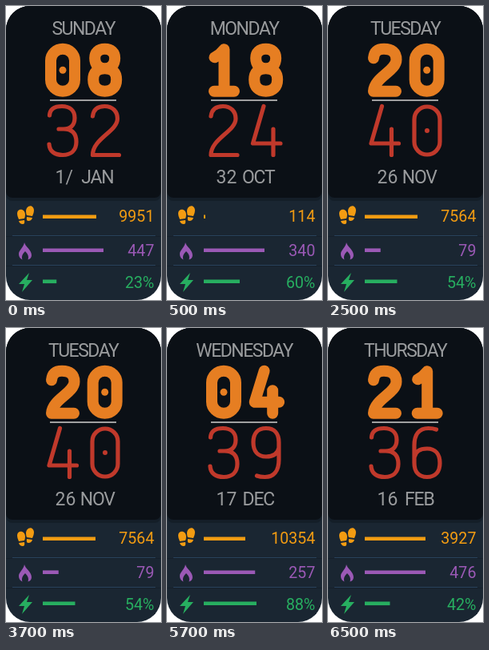
An HTML page that plays this animation: 194 by 368 pixels, repeating every 8000 ms.

```html
<!DOCTYPE html>
<html lang="en">
<head>
<meta charset="utf-8">
<title>Watch face</title>
<style>
  html, body { margin: 0; width: 100%; height: 100%; overflow: hidden; background: #fff; }
  svg { display: block; width: 100vw; height: 100vh; }
  text { font-family: Roboto, "Noto Sans", sans-serif; }
  .label { font-size: 23px; fill: #999b9d; text-anchor: middle; letter-spacing: -1.5px; }
  #date { text-anchor: start; letter-spacing: 0; }
  #month { letter-spacing: -1.2px; }
  .value { font-size: 19.7px; text-anchor: end; }
  .digits { fill: none; stroke-linecap: round; stroke-linejoin: round; }
  .bar { stroke-width: 4.6; }
  .steps { fill: #f39c12; stroke: #f39c12; }
  .heat { fill: #9b59b6; stroke: #9b59b6; }
  .power { fill: #27ae60; stroke: #27ae60; }
  .value, .icon { stroke: none; }
</style>
</head>
<body>
<svg viewBox="0 0 194 368">
  <clipPath id="face"><rect width="194" height="368" rx="30"/></clipPath>
  <g clip-path="url(#face)">
    <rect width="194" height="368" fill="#1a2632"/>
    <rect y="-10" width="194" height="254" rx="8" fill="#141e28"/>
    <rect y="-10" width="194" height="250" rx="8" fill="#0b1016"/>
    <path d="M0 288.5H194M0 325.5H194" stroke="#16202b"/>
    <path d="M8 287.5H187M8 324.5H187" stroke="#29435d"/>
  </g>

  <text id="day" class="label" x="96.7" y="36"/>
  <g id="hours" class="digits" stroke="#e67e22" stroke-width="14"/>
  <path d="M55 118H138" stroke="#a0a0a0" stroke-width="2"/>
  <g id="minutes" class="digits" stroke="#c0392b" stroke-width="5.2"/>
  <text id="date" class="label" x="61.5" y="222"/>
  <text id="month" class="label" x="114.3" y="222"/>

  <g class="steps">
    <path class="icon" d="M17 255C21 254 24 257 24 261Q24 264 23 266L16 267Q14 263 14 260Q14 256 17 255ZM16 269L23 268Q24 273 21 273Q17 273 16 269ZM32 250.5C28 249.5 25 253 25 257Q25 260 26 262L33 263Q35 259 35 256Q35 252 32 250.5ZM33 265L26 264Q25 269 28 269Q32 269 33 265Z"/>
    <path class="bar"/><text class="value" x="185.5" y="269.7"/>
  </g>
  <g class="heat">
    <path class="icon" d="M23 296C24 301 32 305 32 312C32 315 30 317 27.5 317.5C29 313 27 310 24 307C21 310 19 313 20.5 317.5C17 316 16 313 16 310C16 306 22 302 23 296Z"/>
    <path class="bar"/><text class="value" x="185.5" y="312.5"/>
  </g>
  <g class="power">
    <path class="icon" d="M29 334L16 348H23L20 358L33 343H26Z"/>
    <path class="bar"/><text class="value" x="185.5" y="352.5"/>
  </g>
</svg>
<script>
const $ = id => document.getElementById(id);
const bars = document.querySelectorAll(".bar");
const values = document.querySelectorAll(".value");

// Centre lines of the digits, each in its own cell
const bold = {
  0: "M6 21A15 14.5 0 0 1 36 21V45A15 14.5 0 0 1 6 45Z",
  1: "M9.5 17Q16 14 21.5 7V59.5M9 59.5H34",
  2: "M7 18C8 9 13 6.5 20 6.5C30 6.5 35.5 11 35.5 20C35.5 34 8 42 7 59.5H35",
  4: "M19 6.5L7 45.5H37.5M29.5 31V59.5",
  8: "M21 6.5C13 6.5 8.5 11 8.5 18C8.5 26 13 31 21 31C29 31 33.5 26 33.5 18C33.5 11 29 6.5 21 6.5ZM21 31C11 31 6.5 36 6.5 45C6.5 54 12 59.5 21 59.5C30 59.5 35.5 54 35.5 45C35.5 36 31 31 21 31Z"
};
const thin = {
  0: "M2.5 19A16 16 0 0 1 34.5 19V47A16 16 0 0 1 2.5 47Z",
  2: "M3 15C4 6 10 2.5 18 2.5C28 2.5 34 9 34 18C34 34 3 43 3 63.5H36",
  3: "M2.5 14C3 5 10 2.5 18 2.5C28 2.5 34 8 34 17C34 27 28 31 20 31H14M20 31C30 31 36 36 36 47C36 58 29 63.5 19 63.5C9 63.5 2.5 59 2 50",
  4: "M15.5 2.5L2 49H36.5M27.5 31V63.5",
  6: "M2.5 39C4 31 10 28 18.5 28C29 28 34.5 35 34.5 46C34.5 57 29 63.5 18.5 63.5C8 63.5 2.5 57 2.5 46V24C2.5 10 9 2.5 20 2.5Q26 2.5 30 4",
  9: "M34.5 27C33 35 27 38 18.5 38C8 38 2.5 31 2.5 20C2.5 9 8 2.5 18.5 2.5C29 2.5 34.5 9 34.5 20V42C34.5 56 28 63.5 17 63.5Q11 63.5 7 62"
};

// day, hours, minutes, date, month, steps, step bar length, heat, power
const screens = [
  ["SUNDAY", "08", "32", "1/", "JAN", 9951, 67, 447, 23],
  ["MONDAY", "18", "24", "32", "OCT", 114, 2, 340, 60],
  ["TUESDAY", "20", "40", "26", "NOV", 7564, 66, 79, 54],
  ["WEDNESDAY", "04", "39", "17", "DEC", 10354, 52, 257, 88],
  ["THURSDAY", "21", "36", "16", "FEB", 3927, 76, 476, 42]
];

function drawDigits(id, text, shapes, xs, y, dotX, dotSize) {
  $(id).innerHTML = [...text].map((d, i) => {
    const dot = d === "0" ? `<path d="M${dotX} 33h0" stroke-width="${dotSize}"/>` : "";
    return `<g transform="translate(${xs[i]} ${y})"><path d="${shapes[d]}"/>${dot}</g>`;
  }).join("");
}

function setRow(i, y, length, value) {
  bars[i].setAttribute("d", `M46 ${y}h${length}`);
  values[i].textContent = value;
}

function show([day, hours, minutes, date, month, steps, stepBar, heat, power]) {
  $("day").textContent = day;
  $("date").textContent = date;
  $("month").textContent = month;
  drawDigits("hours", hours, bold, [50, 102.7], 47.3, 21, 9);
  drawDigits("minutes", minutes, thin, [52, 105.5], 123, 18.5, 6);
  setRow(0, 263.7, stepBar, steps);
  setRow(1, 305.7, Math.min(76, heat / 4), heat);
  setRow(2, 344.8, power * 0.75, power + "%");
}

let current = -1;
function tick(now) {
  const index = Math.floor((now % 8000 + 1500) / 2000);
  if (index !== current) show(screens[current = index]);
  requestAnimationFrame(tick);
}
tick(0);
</script>
</body>
</html>
```
